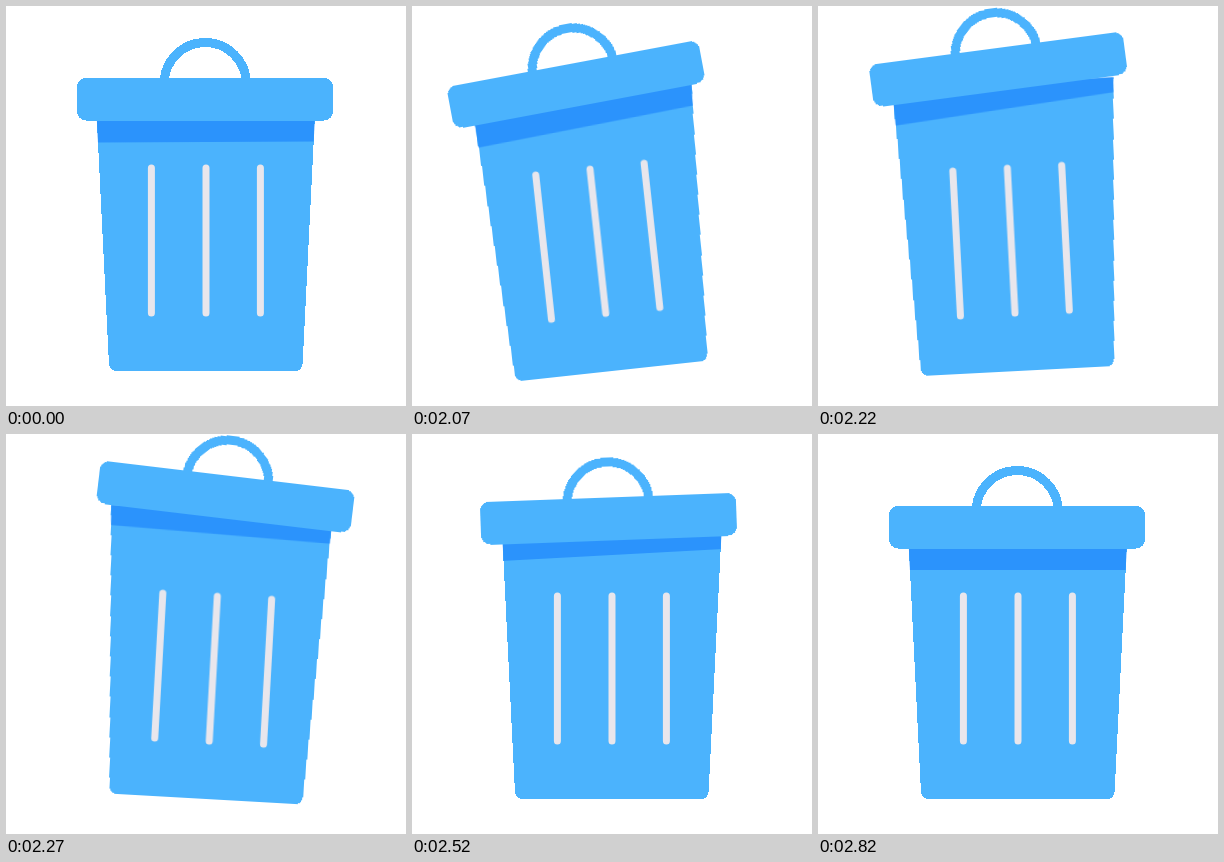
An HTML page for the animation above (2.85 s loop, 400 by 400 pixels).

```html
<!DOCTYPE html>
<html lang="en">
<head>
<meta charset="utf-8">
<title>Trash can</title>
<style>
  html, body { margin: 0; width: 100%; height: 100%; overflow: hidden; background: #fff; }
  svg { display: block; width: 100%; height: 100%; }
  .blue { fill: #4bb3fd; }
  .shade { fill: #2b93fc; }
  .handle { fill: none; stroke: #4bb3fd; stroke-width: 9; }
  .ribs { fill: none; stroke: #e8e6ec; stroke-width: 7; stroke-linecap: round; }
  .blue, .shade, .handle { shape-rendering: crispEdges; }

  /* The script sets the time, so that poses can be held. */
  #can, #lid, #shadow { animation: 2850ms ease-out infinite paused; }
  #can { animation-name: rock; transform-origin: 200px 365px; }
  #lid { animation-name: hop; transform-origin: 199px 93px; }
  #shadow { animation-name: follow; transform-origin: 200px 136px; }

  /* Rest, sudden start, left swing, right swing, rattle, landing, rest. */
  @keyframes rock {
    0%, 70.876% { transform: rotate(0deg); }
    70.877% { transform: rotate(-3.3deg); }
    76.14% { transform: rotate(-9.25deg); animation-timing-function: ease-in-out; }
    79.65% { transform: rotate(3.2deg); animation-timing-function: ease-in-out; }
    88.42%, 100% { transform: rotate(0deg); }
  }
  @keyframes hop {
    0%, 70.876% { transform: translate(0px, 0px) rotate(0deg); }
    70.877% { transform: translate(-1.6px, -4.3px) rotate(-0.7deg); }
    76.14% { transform: translate(-6px, -30.3px) rotate(-8.3deg); animation-timing-function: ease-in; }
    79.65% { transform: translate(3.6px, -31.1px) rotate(3.6deg); }
    83.16% { transform: translate(-5.4px, -24.7px) rotate(12.3deg); animation-timing-function: ease-in-out; }
    88.42% { transform: translate(-2.5px, -8.5px) rotate(-2.1deg); }
    98.94%, 100% { transform: translate(0px, 0px) rotate(0deg); }
  }
  @keyframes follow {
    0%, 70.876% { transform: translateY(0px) rotate(-0.27deg); }
    70.877% { transform: translateY(-1.9px) rotate(-0.7deg); }
    76.14% { transform: translateY(-32.2px) rotate(-9.2deg); animation-timing-function: ease-in; }
    79.65% { transform: translateY(-36px) rotate(1.7deg); }
    83.16% { transform: translateY(-28.7px) rotate(12.4deg); animation-timing-function: ease-in-out; }
    88.42% { transform: translateY(-15px) rotate(-3.1deg); }
    98.94%, 100% { transform: translateY(0px) rotate(0deg); }
  }
</style>
</head>
<body>
<svg viewBox="0 0 400 400">
  <defs>
    <path id="bin" d="M89 76.5H310.6L296.7 357Q296.3 365 289 365H111Q103.3 365 102.9 357Z"/>
    <clipPath id="inside"><use href="#bin"/></clipPath>
  </defs>
  <g id="can">
    <use href="#bin" class="blue"/>
    <g clip-path="url(#inside)">
      <rect id="shadow" class="shade" x="40" y="-20" width="320" height="156"/>
    </g>
    <path class="ribs" d="M145.4 162V307M200 162V307M254.4 162V307"/>
    <g id="lid">
      <path class="handle" d="M158.2 77.5a41 41 0 0 1 82 0"/>
      <rect class="blue" x="71" y="72" width="256" height="42.5" rx="9"/>
    </g>
  </g>
</svg>
<script>
const LOOP = 2850, START = 2020;
const moves = document.getAnimations();

// Poses are held for 30 ms and 20 ms in turn.
function hold(t) {
  if (t < START) return 0;
  const part = (t - START) % 50;
  return t - part + (part < 30 ? 0 : 30);
}

const origin = performance.now();
function tick() {
  const t = hold((performance.now() - origin) % LOOP);
  // A hair later, so that the first pose falls after the hard change.
  for (const move of moves) move.currentTime = t + 0.1;
  requestAnimationFrame(tick);
}
tick();
</script>
</body>
</html>
```
